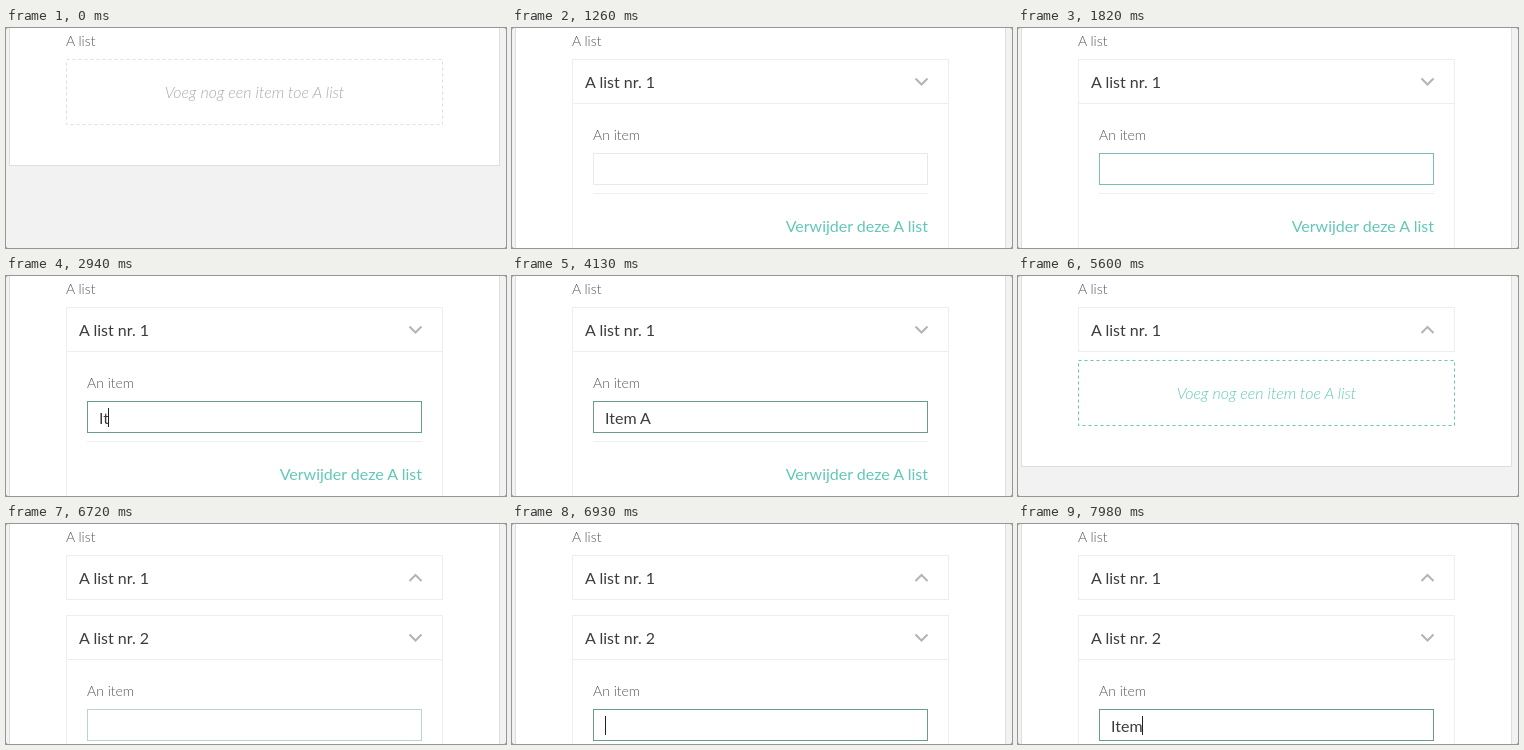
An HTML page for the animation above (8000 ms loop, 500 by 220 pixels).

```html
<!DOCTYPE html>
<html lang="nl">
<head>
<meta charset="utf-8">
<title>List editor</title>
<style>
  html, body { margin: 0; width: 100%; height: 100%; overflow: hidden; background: #888; }
  svg { display: block; width: 500px; height: 220px; border-radius: 2px; background: #f2f2f2; }
  text { font: 400 16px Lato, sans-serif; fill: #3c3c3c; stroke: none; white-space: pre; }
  .label { font-weight: 300; font-size: 14px; fill: #555; }
  .panel { fill: #fff; stroke: #dedede; }
  .box { fill: #fff; stroke: #eee; }
  .chevron { fill: none; stroke: #b4b4b4; stroke-width: 2; }
  .remove { fill: #62c8b8; text-anchor: end; }
  .prompt { font-weight: 300; font-style: italic; text-anchor: middle; fill: inherit; }
  .dashes { fill: none; stroke-dasharray: 3 3; }
  .caret { fill: #222; }

  .scene, .add, .field, .caret { animation: 8s step-end infinite; }
  .scene { visibility: hidden; }
  #empty { animation-name: empty; }
  #first { animation-name: first; }
  #closed { animation-name: closed; }
  #second { animation-name: second; }
  @keyframes empty { 0% { visibility: visible } 15.75%, 100% { visibility: hidden } }
  @keyframes first { 0% { visibility: hidden } 15.75% { visibility: visible } 65.625%, 100% { visibility: hidden } }
  @keyframes closed { 0% { visibility: hidden } 65.625% { visibility: visible } 75.25%, 100% { visibility: hidden } }
  @keyframes second { 0% { visibility: hidden } 75.25%, 100% { visibility: visible } }

  .add { fill: #aaa; stroke: #dedede; }
  #empty .add { animation-name: hover1; }
  #closed .add { animation-name: hover2; }
  @keyframes hover1 { 8.75%, 100% { fill: #62c8b8; stroke: #62c8b8 } }
  @keyframes hover2 { 70%, 100% { fill: #62c8b8; stroke: #62c8b8 } }

  .field { fill: #fff; stroke: #e9e9e9; }
  #first .field { animation-name: focus1; }
  #second .field { animation-name: focus2; }
  @keyframes focus1 {
    21.875% { stroke: #b5d5cc }
    22.75% { stroke: #7cbdb7 }
    24.5% { stroke: #70ab9f }
    25.375% { stroke: #6ca294 }
    28% { stroke: #6a9c8b }
    56% { stroke: #6fa394 }
    56.875% { stroke: #6a9c8b }
    63.875% { stroke: #93b5aa }
    64.75%, 100% { stroke: #bbb }
  }
  @keyframes focus2 {
    84% { stroke: #b8d6cd }
    84.875% { stroke: #8fbcb0 }
    85.75% { stroke: #76a899 }
    86.625%, 100% { stroke: #6a9c8b }
  }

  .caret { opacity: 0; }
  #first .caret { animation-name: blink1; }
  #second .caret { animation-name: blink2; }
  @keyframes blink1 {
    24.5% { opacity: 1 } 30.625% { opacity: 0 }
    35% { opacity: 1 } 51.625% { opacity: 0 }
    58.625% { opacity: 1 } 63.875%, 100% { opacity: 0 }
  }
  @keyframes blink2 {
    84.875% { opacity: 1 } 91% { opacity: 0 } 94.5%, 100% { opacity: 1 }
  }
</style>
</head>
<body>
<svg viewBox="0 0 500 220">
  <defs>
    <g id="add">
      <rect class="dashes" x="60.5" y="31.5" width="376" height="65"/>
      <text class="prompt" x="248.5" y="70">Voeg nog een item toe A list</text>
    </g>
    <path id="down" class="chevron" d="M403.5 50.5l6 6 6-6"/>
    <path id="up" class="chevron" d="M403.5 57l6-6 6 6"/>
    <g id="card">
      <rect class="box" x="60.5" y="31.5" width="376" height="300"/>
      <path class="box" d="M60.5 75.5h376M81 165.5h335"/>
      <use href="#down"/>
      <text class="label" x="81" y="112">An item</text>
      <text class="remove" x="416" y="204">Verwijder deze A list</text>
    </g>
    <g id="folded">
      <rect class="box" x="60.5" y="31.5" width="376" height="44"/>
      <use href="#up"/>
      <text x="73" y="60">A list nr. 1</text>
    </g>
  </defs>

  <g id="empty" class="scene">
    <rect class="panel" x="3.5" y="-9.5" width="490" height="147"/>
    <use href="#add" class="add"/>
  </g>

  <g id="first" class="scene">
    <rect class="panel" x="3.5" y="-9.5" width="490" height="300"/>
    <use href="#card"/>
    <text x="73" y="60">A list nr. 1</text>
    <rect class="field" x="81.5" y="125.5" width="334" height="31"/>
    <text class="typed" x="93" y="148"></text>
    <rect class="caret" y="132" width="1" height="19"/>
  </g>

  <g id="closed" class="scene">
    <rect class="panel" x="3.5" y="-9.5" width="490" height="200"/>
    <use href="#folded"/>
    <use href="#add" class="add" y="53"/>
  </g>

  <g id="second" class="scene">
    <rect class="panel" x="3.5" y="-9.5" width="490" height="300"/>
    <use href="#folded"/>
    <g transform="translate(0 60)">
      <use href="#card"/>
      <text x="73" y="60">A list nr. 2</text>
      <rect class="field" x="81.5" y="125.5" width="334" height="31"/>
      <text class="typed" x="93" y="148"></text>
      <rect class="caret" y="132" width="1" height="19"/>
    </g>
  </g>

  <text class="label" x="60" y="18">A list</text>
</svg>
<script>
  const LOOP = 8000;
  const word = 'Item A';
  // Key press times for each field
  const fields = [
    ['first', [2800, 2940, 3080, 3150, 3360, 3640]],
    ['second', [7560, 7770, 7840, 7980]]
  ].map(([id, keys]) => {
    const scene = document.getElementById(id);
    return { keys, text: scene.querySelector('.typed'), caret: scene.querySelector('.caret') };
  });

  let start;
  function draw(now) {
    start ??= now;
    const t = (now - start) % LOOP;
    for (const { keys, text, caret } of fields) {
      const value = word.slice(0, keys.filter(k => k <= t).length);
      text.textContent = value;
      const width = value ? text.getComputedTextLength() : 0;
      caret.setAttribute('x', Math.round(93 + width - 0.5));
    }
    requestAnimationFrame(draw);
  }
  requestAnimationFrame(draw);
</script>
</body>
</html>
```
